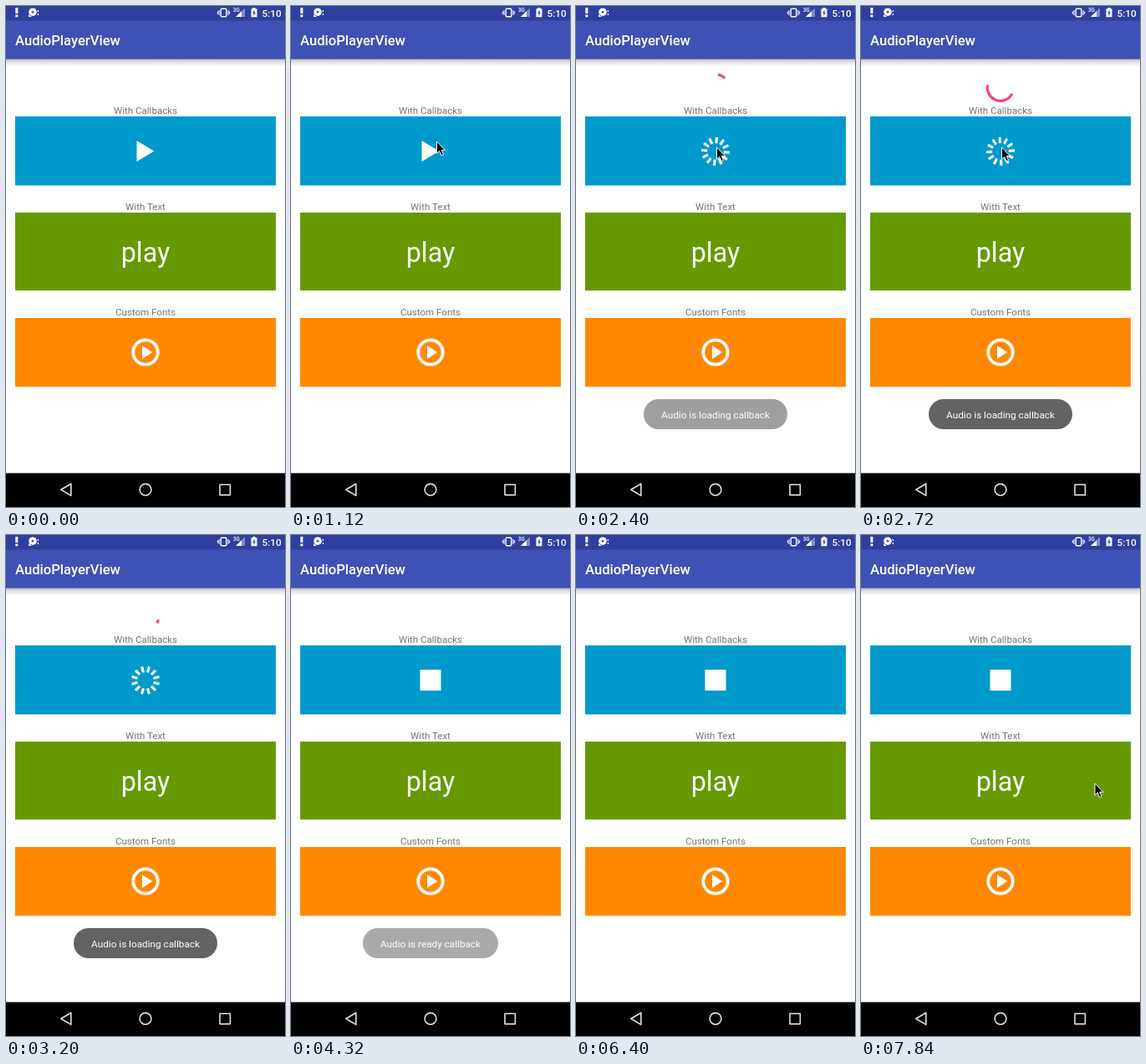
These frames come from a looping animation (334 px wide and 599 px high, 8000 ms). An HTML page:

```html
<!DOCTYPE html>
<html lang="en">
<head>
<meta charset="utf-8">
<title>AudioPlayerView</title>
<style>
html, body { margin: 0; width: 100%; height: 100%; overflow: hidden; background: #fff; }
svg { display: block; width: 100%; height: 100%; }
text { font-family: Roboto, "Noto Sans", sans-serif; }
.mid { text-anchor: middle; }
.label { font-size: 11.55px; fill: #757575; }
.toast { font-size: 11.75px; fill: #fff; }
</style>
</head>
<body>
<svg viewBox="0 0 334 599">
  <defs>
    <linearGradient id="shade" x2="0" y2="1">
      <stop offset="0" stop-color="#b8b8b8"/>
      <stop offset=".45" stop-color="#e2e2e2"/>
      <stop offset="1" stop-color="#fcfcfc"/>
    </linearGradient>
  </defs>

  <rect width="334" height="599" fill="#fff"/>
  <rect y="63" width="334" height="9" fill="url(#shade)"/>
  <rect y="17" width="334" height="46.5" fill="#3f51b5"/>
  <rect width="334" height="17.5" fill="#303f9f"/>
  <text x="11" y="47" font-size="16.6" font-weight="500" fill="#fff">AudioPlayerView</text>

  <g id="status" fill="#fff">
    <path d="M11.3 2h3v7h-3zM11.3 10.5h3v2.7h-3z"/>
    <circle cx="32" cy="7.2" r="4.8"/>
    <path d="M27 10v3h4zM37.8 5h1.2v2h-1.2zM37.8 9h1.2v2h-1.2z"/>
    <circle cx="32" cy="7.2" r="1.3" fill="#303f9f"/>
    <rect x="257.2" y="3.2" width="6.6" height="9.6" rx="1" fill="none" stroke="#fff" stroke-width="1.4"/>
    <path d="M255 5v6M266 5v6M253.4 6.5v3M267.6 6.5v3" stroke="#fff" stroke-width="1.1"/>
    <text x="272" y="7" font-size="6.3" font-weight="500">3G</text>
    <path d="M275 13L286 2.2V13z" opacity=".4"/>
    <path d="M275 13L282 6.2V13z"/>
    <path d="M293.5 3.2h2V2h3v1.2h2V13.3h-7z"/>
    <path d="M298 4.6l-3 4h1.8l-.7 3.4 3-4.2h-1.8z" fill="#303f9f"/>
    <text x="306.5" y="12.5" font-size="11.8" font-weight="500">5:10</text>
  </g>

  <text class="label mid" x="167" y="129">With Callbacks</text>
  <rect x="11" y="132" width="312" height="82.5" fill="#0099cc"/>
  <text class="label mid" x="167" y="244">With Text</text>
  <rect x="11" y="247" width="312" height="93.2" fill="#669900"/>
  <text class="mid" x="167" y="306" font-size="32.3" fill="#fff">play</text>
  <text class="label mid" x="167" y="369.5">Custom Fonts</text>
  <rect x="11" y="373" width="312" height="82.3" fill="#ff8800"/>
  <circle cx="167" cy="414" r="14.7" fill="none" stroke="#fff" stroke-width="3.8"/>
  <path d="M163 406L175.3 414L163 422z" fill="#fff"/>

  <path id="play" d="M156.5 161L177.3 173.5L156.5 186z" fill="#fff"/>
  <rect id="stop" x="154.5" y="161" width="25" height="25" fill="#fff"/>
  <g id="spinner" stroke="#fff" stroke-width="3.1"></g>
  <path id="arc" fill="none" stroke="#ff4081" stroke-width="3.2"/>

  <g id="loading">
    <rect x="81" y="470" width="172" height="36" rx="18" fill="#636363"/>
    <text class="toast mid" x="167" y="493">Audio is loading callback</text>
  </g>
  <g id="ready">
    <rect x="86" y="470" width="162" height="36" rx="18" fill="#636363"/>
    <text class="toast mid" x="167" y="493">Audio is ready callback</text>
  </g>

  <rect y="558.5" width="334" height="41" fill="#000"/>
  <g fill="none" stroke="#e0e0e0" stroke-width="1.6" stroke-linejoin="round">
    <path d="M65.8 578.3L77.8 571.2V585.4z"/>
    <circle cx="167" cy="578.3" r="6.9"/>
    <rect x="256" y="572.2" width="12.4" height="12.4"/>
  </g>

  <path id="cursor" d="M0 0V14.2L3.2 11.2L5.6 16.6L8 15.5L5.7 10.3H10z" fill="#000" stroke="#fff" stroke-width="1"/>
</svg>
<script>
const LOOP = 8000, STEP = 160;
const $ = id => document.getElementById(id);
const show = (id, on) => $(id).setAttribute('visibility', on ? 'visible' : 'hidden');
const clamp = v => Math.min(1, Math.max(0, v));

// Linear interpolation through [time, ...values] keys.
function track(keys, t) {
  if (t <= keys[0][0]) return keys[0].slice(1);
  for (let i = 1; i < keys.length; i++) {
    const a = keys[i - 1], b = keys[i];
    if (t <= b[0]) {
      const u = (t - a[0]) / (b[0] - a[0]);
      return a.slice(1).map((v, k) => v + (b[k + 1] - v) * u);
    }
  }
  return keys[keys.length - 1].slice(1);
}

const loadingFade = [[2080, 0], [2400, .61], [2560, 1], [3840, 1], [4000, .95], [4280, 0]];
const readyFade = [[4160, 0], [4320, .55], [4480, 1], [5760, 1], [5920, .96], [6080, .65], [6240, .25], [6400, 0]];
const firstVisit = [[640, 312, 250], [800, 250, 200], [960, 196, 170], [1120, 174.5, 162], [1280, 171, 166], [1440, 168.5, 169]];
const secondVisit = [[7680, 310.5, 325], [7840, 280, 297]];

for (let a = 0; a < 360; a += 30)
  $('spinner').innerHTML += `<path d="M0 -9.8V-17" transform="rotate(${a})"/>`;

function arcPath(from, to) {
  const at = deg => {
    const r = deg * Math.PI / 180;
    return `${167 + 15.8 * Math.sin(r)} ${97.5 - 15.8 * Math.cos(r)}`;
  };
  return `M${at(from)}A15.8 15.8 0 ${to - from > 180 ? 1 : 0} 1 ${at(to)}`;
}

function render(ms) {
  const t = Math.floor(ms / STEP) * STEP;
  const busy = t >= 2080 && t < 3520;
  show('play', t < 2080);
  show('spinner', busy);
  show('stop', t >= 3520);
  show('arc', t >= 2240 && busy);

  $('spinner').setAttribute('transform', `translate(167 173.8) rotate(${5 + (t - 2400) * .35})`);
  const u = (t - 2400) / 800, e = clamp(u);
  const tail = 10 + 150 * u + 303 * e * e;
  const head = 45 + 175 * u + 259 * (1 - (1 - e) ** 2);
  $('arc').setAttribute('d', arcPath(tail, head));

  $('loading').setAttribute('opacity', track(loadingFade, t)[0]);
  $('ready').setAttribute('opacity', track(readyFade, t)[0]);

  show('cursor', (t >= 640 && t < 2880) || t >= 7680);
  const [x, y] = track(t < 4000 ? firstVisit : secondVisit, t);
  $('cursor').setAttribute('transform', `translate(${x} ${y})`);
}

const start = performance.now();
function tick() {
  render((performance.now() - start) % LOOP);
  requestAnimationFrame(tick);
}
tick();
</script>
</body>
</html>
```
